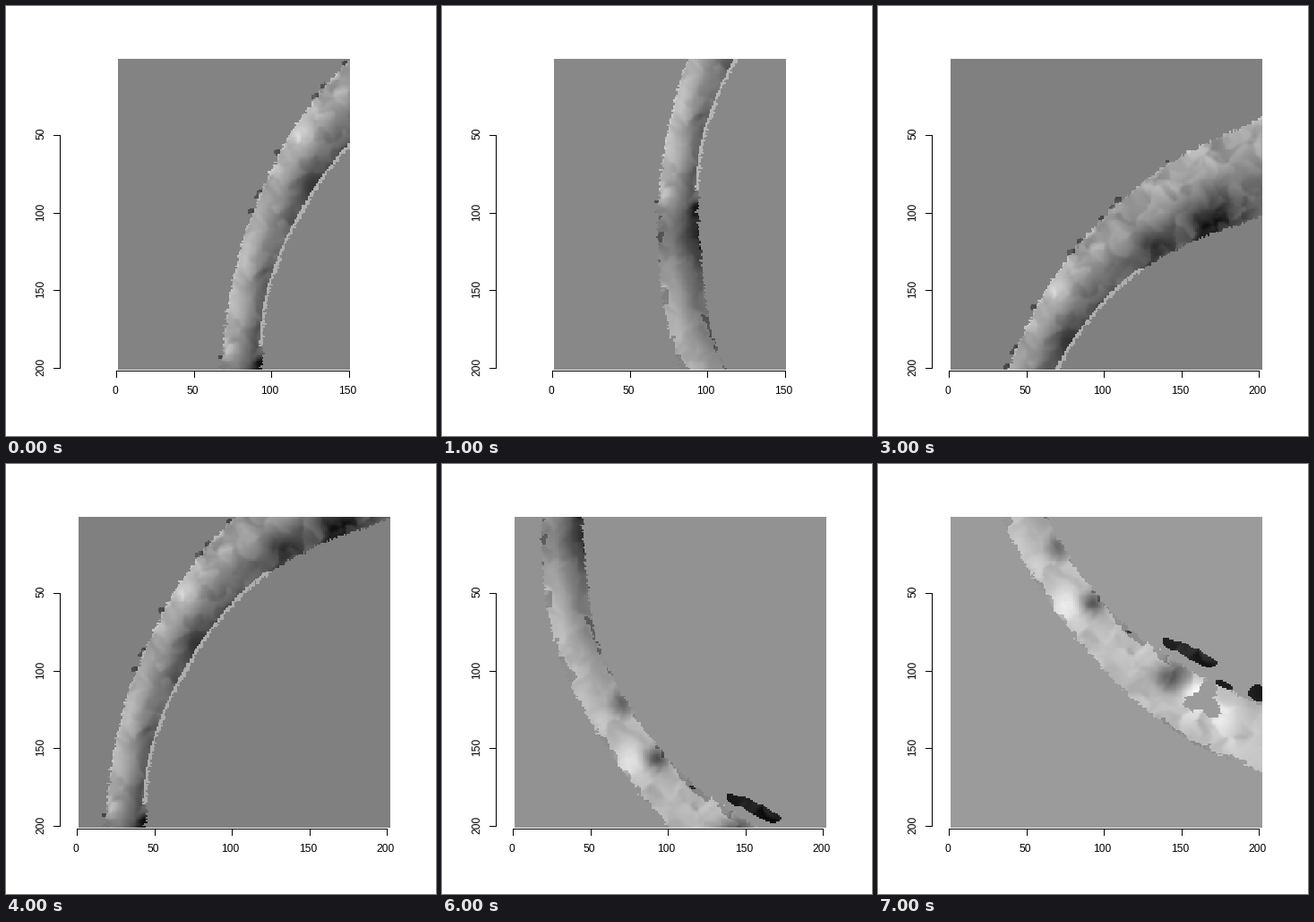
A matplotlib script for the animation above (8000 ms loop, 480 px wide and 480 px high).

```python
import numpy as np
import matplotlib.pyplot as plt
from matplotlib.animation import FuncAnimation
from matplotlib.path import Path

W, H = 200, 600          # whole map in cells; each view is a window on it
DPI = 100
PX = 72 / DPI            # one pixel in points
STEP = 86.6              # pixels between axis ticks
rng = np.random.default_rng(12)
row, col = np.mgrid[0:H, 0:W] + 0.5

# key points of the two banks of the band: column, row
OUTER = [(203, 36), (132, 72.6), (75, 128.5), (45, 180), (26.4, 233), (17, 302),
         (24.7, 375.5), (52, 437), (97, 497), (149, 541), (203, 566)]
INNER = [(203, 100), (149, 120.5), (107, 149), (73, 193), (51, 240), (43.5, 285),
         (47, 344), (57, 390), (92, 448), (132, 485), (203, 524)]
# strongest light and dark spots: column, row, radius, strength
SPOTS = [(168, 105, 14, -65), (130, 121, 8, -50), (72, 180, 10, -30), (68, 148, 7, 35),
         (42, 296, 4, -75), (67, 421, 6, -70), (74, 456, 9, 45), (91, 455, 6, -100),
         (141, 503, 8, -95), (155, 513, 6, 65), (175, 530, 9, 40)]
# loose flakes: column, row, half length, half width
FLAKES = [(154, 487, 18, 4), (114, 474, 3.5, 1.5), (198, 514, 6, 4), (175.5, 508, 7, 1.5)]


def smooth(x, a, b):
    t = np.clip((x - a) / (b - a), 0, 1)
    return t * t * (3 - 2 * t)


def spline(points, n=16):
    """Catmull-Rom curve through the key points."""
    p = np.array(points, float)
    p = np.vstack([2 * p[0] - p[1], p, 2 * p[-1] - p[-2]])
    t = np.linspace(0, 1, n, endpoint=False)[:, None]
    parts = []
    for a, b, c, d in zip(p, p[1:], p[2:], p[3:]):
        parts.append(b + t * (c - a) / 2 + t ** 2 * (a - 2.5 * b + 2 * c - d / 2)
                     + t ** 3 * (1.5 * (b - c) + (d - a) / 2))
    return np.vstack(parts + [p[-2:-1]])


def distance(curve):
    best = np.full((H, W), 1e9)
    for x, y in curve:
        best = np.minimum(best, (col - x) ** 2 + (row - y) ** 2)
    return np.sqrt(best)


def inside(polygon, jitter):
    """Cells in a polygon, with edges frayed per row and per column."""
    x = col + rng.normal(0, jitter, (H, 1))
    y = row + rng.normal(0, jitter, (1, W))
    cells = np.column_stack([x.ravel(), y.ravel()])
    return Path(polygon).contains_points(cells).reshape(H, W)


def blur(a):
    for axis in (0, 1):
        a = (np.roll(a, 1, axis) + 2 * a + np.roll(a, -1, axis)) / 4
    return a


def patches(count):
    """Cloudy patches with fairly sharp borders, roughly -1 to 1."""
    x = col + 2 * np.sin(row / 3.1) + rng.normal(0, 0.4, (H, W))
    y = row + 2 * np.sin(col / 3.7 + row / 9)
    best = np.full((H, W), 1e9)
    out = np.zeros((H, W))
    for _ in range(count):
        dx, dy = x - rng.uniform(0, W), y - rng.uniform(0, H)
        level, gx, gy = rng.uniform(-1, 1), *rng.normal(0, 0.06, 2)
        d = dx * dx + dy * dy
        near = d < best
        best[near] = d[near]
        out[near] = (level + gx * dx + gy * dy)[near]
    return blur(out)


def tilted(x, y, length, width, angle=0.4):
    """Below 1 inside a tilted ellipse."""
    c, s = np.cos(angle), np.sin(angle)
    dx, dy = col - x, row - y
    return np.hypot((c * dx + s * dy) / length, (c * dy - s * dx) / width)


def build_map():
    outer, inner = spline(OUTER), spline(INNER)
    d_out, d_in = distance(outer), distance(inner)
    coarse, fine = patches(600), patches(1900)

    # light outer side, dark inner side, turning light further down
    lower = smooth(row, 340, 440)
    u = smooth(d_out / (d_out + d_in) + 0.12 * coarse, 0.2, 0.9)
    v = 36 - 68 * u + lower * (68 * u - 2)
    v -= 45 * np.exp(-((row - 312) / 22) ** 2)
    for x, y, r, a in SPOTS:
        v += a * np.exp(-((col - x) ** 2 + (row - y) ** 2) / (1.6 * r * r))
    v += (1 - 0.45 * smooth(row, 280, 340)) * (18 * coarse + 14 * fine)

    v[(row > 135) & (row < 285) & (d_in < 2.3)] = 45
    v[(row < 285) & (d_out < 1.3)] += 15
    v[(row > 300) & (np.minimum(d_out, d_in) < 4 * fine)] -= 45

    angle = np.linspace(0, 2 * np.pi, 60)
    lobes = 10 + 3.5 * np.cos(3 * (angle - 0.87))
    hole = np.column_stack([163 + lobes * np.cos(angle), 518 + lobes * np.sin(angle)])
    band = inside(np.vstack([outer, inner[::-1]]), 0.6) & ~inside(hole, 0.5)
    v = np.where(band, v, 0)

    ragged = 0.35 * fine
    for flake in FLAKES:
        v = np.where(tilted(*flake) + ragged < 1, -115 + 15 * fine, v)
    upper_bank = outer[outer[:, 1] < 300]
    for x, y in rng.choice(upper_bank, 11, replace=False):
        r = rng.uniform(1, 3)
        v = np.where(tilted(x - 1, y - 1, r, r / 1.5, -0.6) + ragged < 1, -50 + 20 * fine, v)
    return v


strip = np.pad(build_map(), ((0, 0), (50, 0)))

fig = plt.figure(figsize=(480 / DPI, 480 / DPI), dpi=DPI, facecolor="white")
ax = fig.add_axes([0, 0, 1, 1])
ax.axis("off")
picture = ax.imshow(np.zeros((2, 2)), cmap="gray", vmin=0, vmax=255,
                    interpolation="nearest", aspect="auto")


def line(xs, ys):
    return ax.plot(np.array(xs) + 0.5, np.array(ys) + 0.5, color="black", lw=PX,
                   solid_capstyle="projecting", snap=True)[0]


def label(x, y, value, angle=0):
    return ax.text(x, y, str(value), family="Liberation Sans", size=12 * PX, ha="center",
                   va="baseline", rotation=angle, rotation_mode="anchor")


def x_axis(start, count):
    ticks = [round(start + STEP * i) for i in range(count)]
    parts = [line([ticks[0], ticks[-1]], [406, 406])]
    for i, x in enumerate(ticks):
        parts += [line([x, x], [406, 413]), label(x - 0.3, 433, 50 * i)]
    return parts


line([59, 59], [143, 403])
for i in range(4):
    y = round(143 + STEP * i)
    line([52, 59], [y, y])
    label(42.5, y - 0.5, 50 * (i + 1), 90)
narrow_axis = x_axis(122, 4)
wide_axis = x_axis(78, 5)


def draw(i):
    # three narrow windows, then five wide ones, each a half window further down
    narrow = i < 3
    top = 100 * (i + 1 if narrow else i - 3)
    depth = max(top - 100, 0)
    grey = 131 + 0.045 * depth if narrow else 128 + 0.09 * depth
    left, width = (0, 150) if narrow else (50, 200)
    view = strip[top:top + 200, left:left + width]
    picture.set_data(np.clip(grey + view, 0, 255))
    picture.set_extent((125, 384, 406, 59) if narrow else (81, 429, 406, 59))
    ax.set_xlim(0, 480)
    ax.set_ylim(480, 0)
    for part in narrow_axis:
        part.set_visible(narrow)
    for part in wide_axis:
        part.set_visible(not narrow)
    return [picture]


anim = FuncAnimation(fig, draw, frames=8, interval=1000, repeat=True,
                     repeat_delay=0, blit=False)
plt.show()
```
